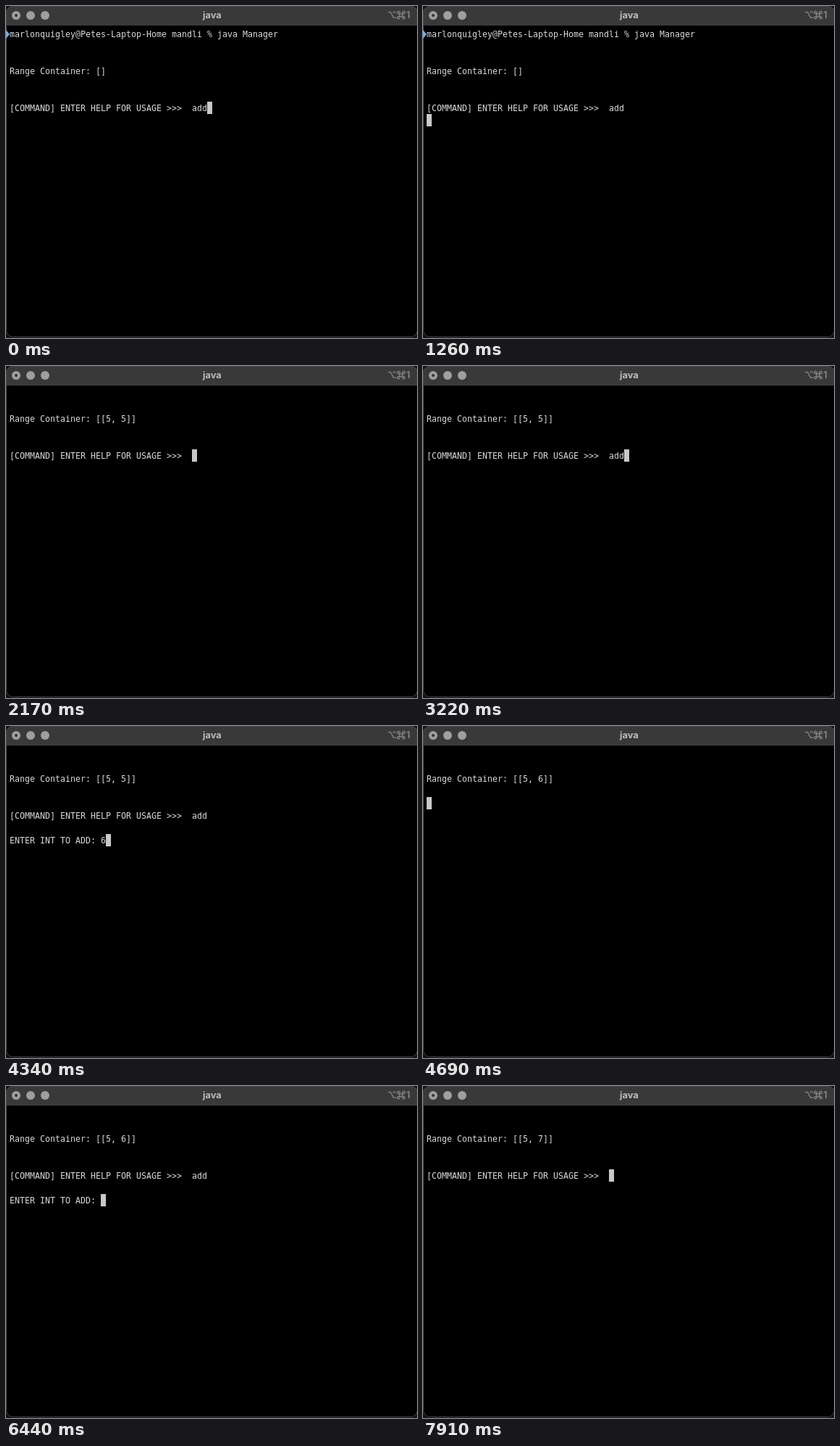
An HTML page that plays this animation: 568x458 px, repeating every 8000 ms.

```html
<!DOCTYPE html>
<html lang="en">
<head>
<meta charset="utf-8">
<title>java</title>
<style>
  html, body { margin: 0; width: 100%; height: 100%; overflow: hidden; background: #111; }
  svg { display: block; }
  #rows text { font: 11.63px "DejaVu Sans Mono", monospace; fill: #dadada; white-space: pre; }
  .title { font: bold 12.8px Inter, sans-serif; fill: #bdbdbd; text-anchor: middle; }
  .hint { font: bold 12.5px Inter, sans-serif; fill: #808080; }
  .keys { fill: none; stroke: #808080; stroke-width: 1.5; }
</style>
</head>
<body>
<svg width="568" height="458" viewBox="0 0 568 458">
  <defs>
    <clipPath id="frame"><rect width="569" height="457" rx="9"/></clipPath>
  </defs>
  <g clip-path="url(#frame)">
    <rect width="569" height="457"/>
    <rect width="569" height="27" fill="#393939"/>
  </g>
  <rect x=".5" y=".5" width="568" height="456" rx="9" fill="none" stroke="#484848"/>
  <g fill="#9f9f9f">
    <circle cx="14" cy="13" r="6"/><circle cx="34" cy="13" r="6"/><circle cx="54" cy="13" r="6"/>
  </g>
  <circle cx="14" cy="13" r="2" fill="#303030"/>
  <text class="title" x="284.8" y="17">java</text>
  <path class="keys" d="M528 8.5h3.5l4 7.5h3.5M534.5 8.5h4.5"/>
  <path class="keys" d="M544 10.5h4v4h-4zM544 10.5h-1.5a1.6 1.6 0 1 1 1.5-1.6zM548 10.5v-1.6a1.6 1.6 0 1 1 1.5 1.6zM548 14.5h1.5a1.6 1.6 0 1 1-1.5 1.6zM544 14.5v1.6a1.6 1.6 0 1 1-1.5-1.6z"/>
  <text class="hint" x="553.3" y="16.5">1</text>
  <path id="mark" d="M0 33l5 6-5 6z" fill="#78aeea"/>
  <g id="rows"></g>
  <rect id="cursor" width="7" height="17" fill="#c9c9c9"/>
</svg>
<script>
const LOOP = 8000, LEFT = 5, TOP = 30, CELL = 7, LINE = 17;
const $ = id => document.getElementById(id);

const shell = ['marlonquigley@Petes-Laptop-Home mandli % java Manager', '', ''];
const cleared = ['', ''];
const range = (head, list) => [...head, 'Range Container: ' + list, '', ''];
const command = (before, typed) => [...before, '[COMMAND] ENTER HELP FOR USAGE >>>  ' + typed];
const ask = (before, typed) => [...command(before, 'add'), '', 'ENTER INT TO ADD: ' + typed];

const empty = range(shell, '[]');
const five = range(cleared, '[[5, 5]]');
const six = range(cleared, '[[5, 6]]');
const seven = range(cleared, '[[5, 7]]');

// Start time and lines; the cursor follows the last line.
const steps = [
  [0, command(empty, 'add')],
  [1260, [...command(empty, 'add'), '']],
  [1330, ask(empty, '')],
  [1750, ask(empty, '5')],
  [2100, five],
  [2170, command(five, '')],
  [2870, command(five, 'a')],
  [3080, command(five, 'ad')],
  [3220, command(five, 'add')],
  [3780, ask(five, '')],
  [4340, ask(five, '6')],
  [4690, six],
  [4760, command(six, '')],
  [5390, command(six, 'a')],
  [5600, command(six, 'ad')],
  [5810, command(six, 'add')],
  [6440, ask(six, '')],
  [7560, ask(six, '7')],
  [7910, command(seven, '')]
];

const rows = Array.from({ length: 9 }, (_, i) => {
  const row = document.createElementNS('http://www.w3.org/2000/svg', 'text');
  row.setAttribute('x', LEFT);
  row.setAttribute('y', TOP + i * LINE + 13);
  return $('rows').appendChild(row);
});

let shown;
function show(lines) {
  rows.forEach((row, i) => row.textContent = lines[i] || '');
  const last = lines.length - 1;
  $('cursor').setAttribute('x', LEFT + lines[last].length * CELL);
  $('cursor').setAttribute('y', TOP + last * LINE);
  $('mark').setAttribute('visibility', lines[0] ? 'visible' : 'hidden');
}

function tick() {
  const t = performance.now() % LOOP;
  const step = steps.findLast(([start]) => start <= t);
  if (step !== shown) show((shown = step)[1]);
  requestAnimationFrame(tick);
}
tick();
</script>
</body>
</html>
```
